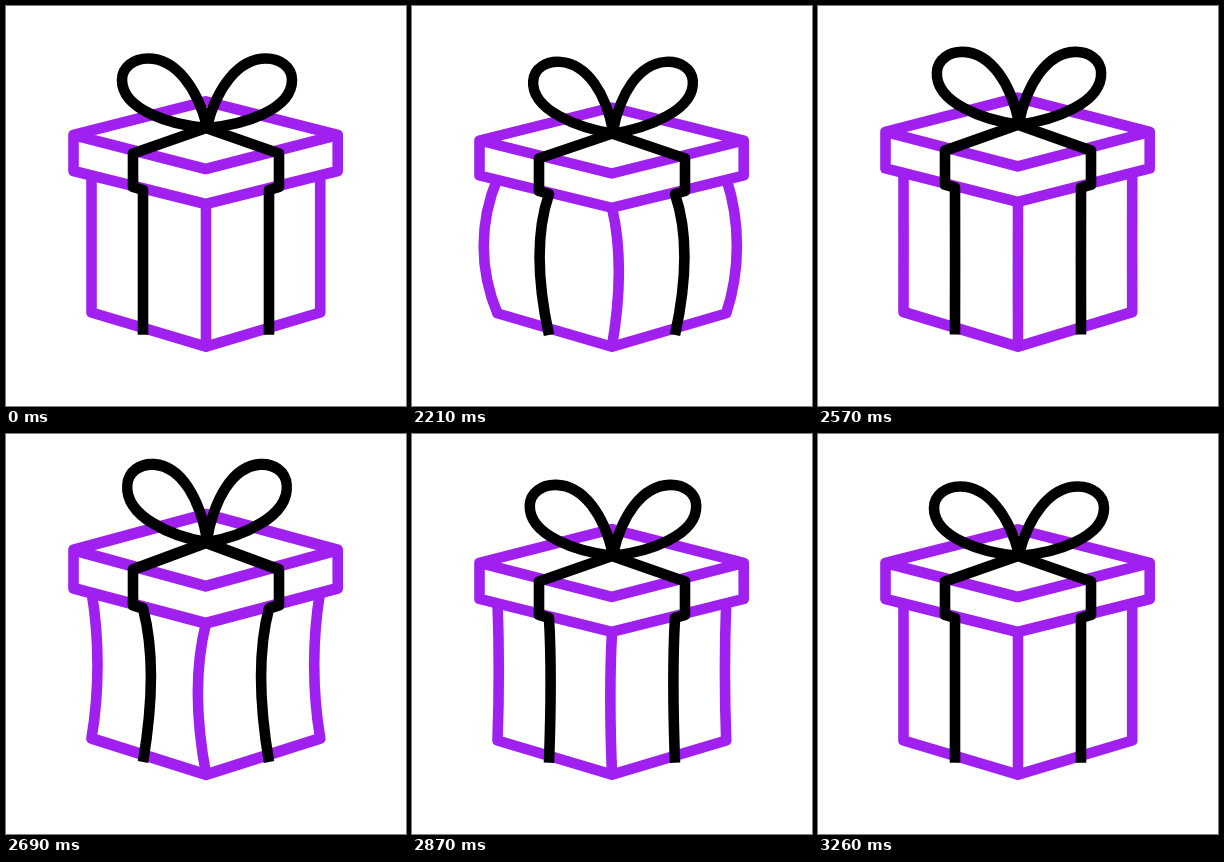
An HTML page with a canvas for the animation above (3.35 s loop, 400x400 px).

```html
<!DOCTYPE html>
<html lang="en">
<head>
<meta charset="utf-8">
<title>Gift box</title>
<style>
  html, body { margin: 0; width: 100%; height: 100%; overflow: hidden; background: #fff; }
  canvas { display: block; width: 400px; height: 400px; }
</style>
</head>
<body>
<canvas id="stage" width="400" height="400"></canvas>
<script>
const ctx = document.getElementById('stage').getContext('2d');

const LOOP = 3350, START = 2000, STEP = 30, STEPS = 42;
const PURPLE = '#a020f0', BLACK = '#000';
const AXIS = 199.7, FLOOR = 342;

// Each key is [step, value]; values ease between neighbours.
const STRETCH = [[0, 1], [14, 0.949], [23, 1.061], [31, 0.99], [37, 1.006], [42, 1]];
const BULGE = [[0, 0], [11, 1, 'out'], [15, 0.98], [23, -1], [32, 0.06], [37, -0.05], [42, 0]];
const PINCH = [[0, 0], [8, 1, 'out'], [15.5, 0.1], [22.5, 1], [32, 0.15], [42, 0]];

function valueAt(keys, step) {
  const next = Math.max(1, keys.findIndex(key => key[0] >= step));
  const [s0, v0] = keys[next - 1];
  const [s1, v1, ease] = keys[next];
  const p = (step - s0) / (s1 - s0);
  const eased = ease === 'out' ? Math.sin(p * Math.PI / 2) : (1 - Math.cos(p * Math.PI)) / 2;
  return v0 + (v1 - v0) * eased;
}

function stroke(color, trace) {
  ctx.beginPath();
  trace();
  ctx.strokeStyle = color;
  ctx.stroke();
}

function line(...points) {
  points.forEach(([x, y], i) => i ? ctx.lineTo(x, y) : ctx.moveTo(x, y));
}

// Continues the path to (x, y1), bowed sideways by about `shift`;
// `lean` moves the widest point towards the start.
function bend(x, y0, y1, shift, lean = 0) {
  const h = y1 - y0, pull = shift * 4 / 3;
  ctx.bezierCurveTo(
    x + pull * (1 + lean), y0 + h * 0.32,
    x + pull * (1 - lean), y1 - h * 0.32, x, y1);
}

// Sideways travel differs between the squashed and the stretched pose.
const sway = (bulge, out, inward) => bulge * (bulge > 0 ? out : inward);

function drawBox(bulge) {
  stroke(PURPLE, () => {
    line([85.5, 168]);
    bend(85.5, 168, 306.5, -sway(bulge, 16.4, 6));
    ctx.lineTo(200, 340.7);
    ctx.lineTo(314.2, 306.5);
    bend(314.2, 306.5, 168, sway(bulge, 12.7, 6));
  });
  stroke(PURPLE, () => {
    line([200, 198]);
    bend(200, 198, 340, 8 * bulge, 0.15);
  });
}

function drawLid() {
  stroke(PURPLE, () => {
    line([67.5, 129], [AXIS, 95.3], [331.7, 129], [331.7, 165], [AXIS, 198], [67.5, 165]);
    ctx.closePath();
    line([67.5, 129], [AXIS, 163], [331.7, 129]);
  });
}

function drawRibbon(bulge) {
  stroke(BLACK, () => {
    for (const dir of [-1, 1]) {
      const outer = 200 + dir * 73, inner = 200 + dir * 63;
      line([200, 122], [outer, 147.5], [outer, 181], [inner, 184]);
      bend(inner, 184, 328.7, dir * sway(bulge, 11.3, 8), 0.22);
    }
  });
}

// Both loops swing up towards each other as they pinch.
function drawBow(pinch) {
  const angle = 0.075 * pinch, narrow = 1 - 0.018 * pinch;
  for (const dir of [-1, 1]) {
    ctx.save();
    ctx.translate(201, 122);
    ctx.scale(dir * narrow, 1);
    ctx.rotate(-angle);
    stroke(BLACK, () => {
      ctx.moveTo(0, 0);
      ctx.bezierCurveTo(36, -3, 85, -18, 85, -48);
      ctx.bezierCurveTo(85, -61, 73, -69.5, 59, -69.5);
      ctx.bezierCurveTo(31, -69.5, 10, -40, 0, -2);
    });
    ctx.restore();
  }
}

function draw(time) {
  const step = Math.min(STEPS, Math.max(0, Math.floor((time % LOOP - START) / STEP)));
  const bulge = valueAt(BULGE, step);

  ctx.setTransform(1, 0, 0, 1, 0, 0);
  ctx.fillStyle = '#fff';
  ctx.fillRect(0, 0, 400, 400);

  // The whole gift squashes and stretches from its base.
  ctx.translate(0, FLOOR);
  ctx.scale(1, valueAt(STRETCH, step));
  ctx.translate(0, -FLOOR);
  ctx.lineWidth = 10.6;
  ctx.lineJoin = 'round';

  drawBox(bulge);
  drawLid();
  drawRibbon(bulge);
  drawBow(valueAt(PINCH, step));
}

const origin = performance.now();
function tick() {
  draw(performance.now() - origin);
  requestAnimationFrame(tick);
}
tick();
</script>
</body>
</html>
```
